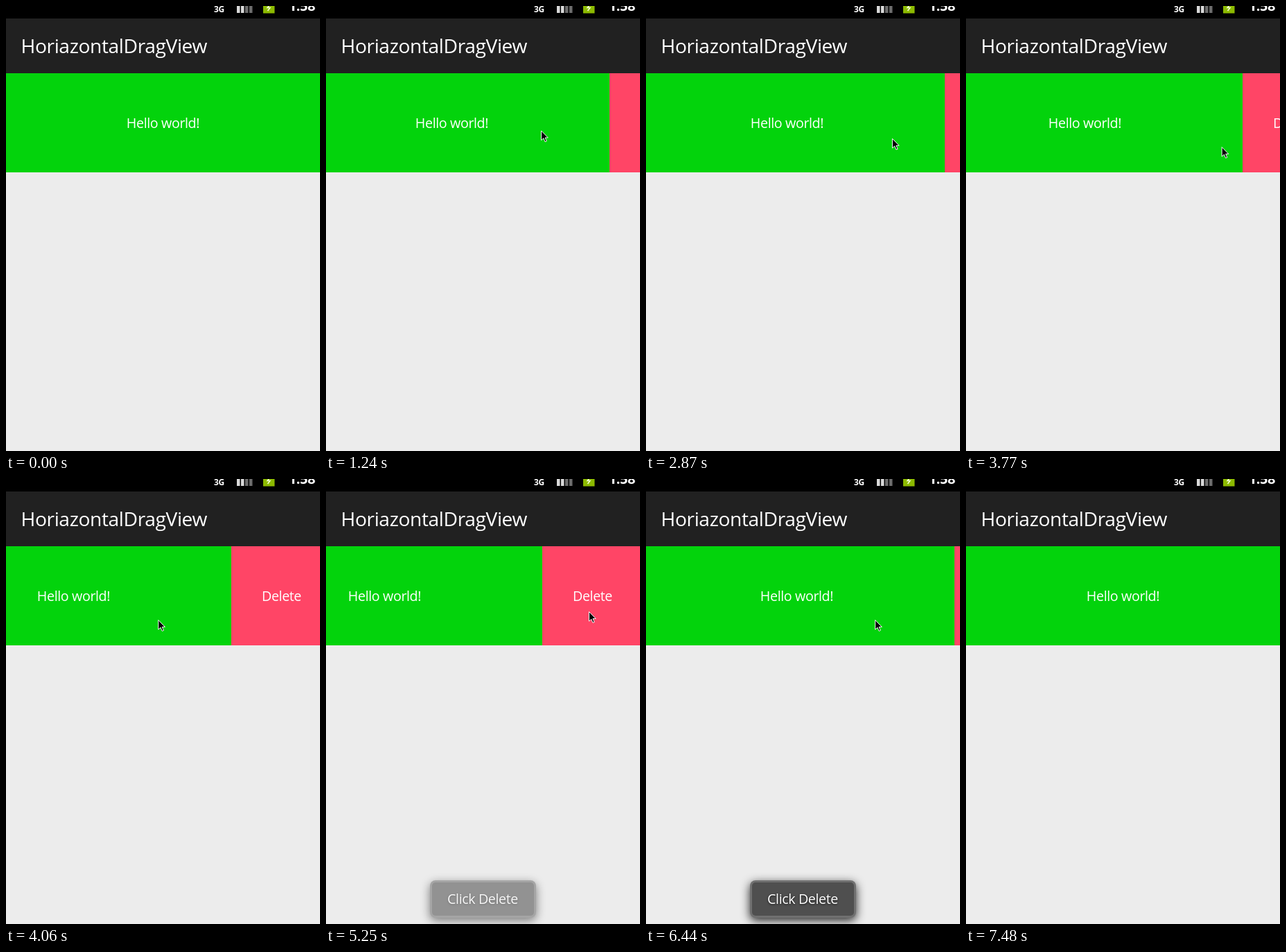
An HTML page with a canvas that plays this animation: 453 by 642 pixels, repeating every 7.66 s.

```html
<!DOCTYPE html>
<html lang="en">
<head>
<meta charset="utf-8">
<title>HoriazontalDragView</title>
<style>
  html, body { margin: 0; width: 100%; height: 100%; overflow: hidden; background: #ececec; }
  canvas { display: block; }
</style>
</head>
<body>
<canvas id="stage" width="453" height="642"></canvas>
<script>
const W = 453, H = 642, LOOP = 7660;
const START = 492, TICK = 148.5;   // the screen refreshes in coarse ticks
const PANEL = 142;                 // width of the delete button
const FONT = '"Open Sans", "Noto Sans", sans-serif';
const ctx = document.getElementById('stage').getContext('2d');

const clamp = v => Math.max(0, Math.min(1, v));

// Each move glides the cursor to x, y and the row to its open state
const away = { x: 480, y: 203, open: 0 };
const moves = [
  { at: 0, ticks: 1, x: 358, y: 167, open: 0 },
  { at: 1, ticks: 3, x: 348, y: 177, open: 0 },
  { at: 5, ticks: 5, x: 228, y: 185, open: 1, ease: 1.7 },
  { at: 14, ticks: 4, x: 380, y: 192, open: 0, ease: 1.3 },
  { at: 18, ticks: 1, ...away },
  { at: 22, ticks: 4, x: 192, y: 203, open: 1, ease: 1.7 },
  { at: 26, ticks: 3, x: 379, y: 191, open: 1 },
  { at: 34, ticks: 3, x: 198, y: 203, open: 1 },
  { at: 38, ticks: 4, x: 339, y: 203, open: 0, ease: 2 },
  { at: 42, ticks: 1, ...away }
];

function stateAt(k) {
  const state = { ...away };
  for (const { at, ticks, ease = 1, ...end } of moves) {
    const q = 1 - (1 - clamp((k - at + 1) / ticks)) ** ease;
    for (const key in end) state[key] += (end[key] - state[key]) * q;
  }
  return state;
}

const toastAlpha = k => Math.min(clamp((k - 31) * 0.57), clamp((47 - k) / 4));

function rect(color, x, y, w, h) {
  ctx.fillStyle = color;
  ctx.fillRect(x, y, w, h);
}

function text(c, str, x, y, size = 19.7, align = 'center', weight = 500) {
  c.font = `${weight} ${size}px ${FONT}`;
  c.letterSpacing = '-0.4px';
  c.textAlign = align;
  c.fillStyle = '#fff';
  c.fillText(str, x, y);
}

function rounded(c, color, x, y, w, h, r) {
  c.fillStyle = color;
  c.beginPath();
  c.roundRect(x, y, w, h, r);
  c.fill();
}

function shadow(c, color, blur, dy) {
  c.shadowColor = color;
  c.shadowBlur = blur;
  c.shadowOffsetY = dy;
}

function makeToast() {
  const layer = document.createElement('canvas');
  layer.width = W;
  layer.height = H;
  const c = layer.getContext('2d');
  shadow(c, 'rgba(0,0,0,0.85)', 14, 4);
  rounded(c, '#707070', 150, 579, 153, 54, 8);
  shadow(c, 'transparent', 0, 0);
  rounded(c, '#4f4f4f', 153, 582, 147, 48, 5);
  shadow(c, 'rgba(0,0,0,0.7)', 3, 1);
  text(c, 'Click Delete', 226, 612.5);
  return layer;
}

function drawStatusBar() {
  rect('#000', 0, 0, W, 18);
  text(ctx, '3G', 300, 9, 12, 'left', 700);
  for (let i = 0; i < 4; i++) rect(i < 2 ? '#dadada' : '#6c6c6c', 333 + i * 6, 0, 4.5, 10);
  rect('#8cba00', 371, 0, 16.5, 10.5);
  ctx.strokeStyle = '#f4ffd8';
  ctx.lineWidth = 1.5;
  ctx.stroke(new Path2D('M381 -2L377 2.5H381L377.5 7'));
  text(ctx, '1:58', 446, 7, 20, 'right', 700);
}

const arrow = new Path2D('M0 0V15.5L3.7 12.2L6.2 18L8.7 17L6.3 11.3H11Z');

function drawCursor(x, y) {
  ctx.save();
  ctx.translate(x + 0.5, y + 0.5);
  ctx.scale(0.88, 0.88);
  ctx.fillStyle = '#000';
  ctx.fill(arrow);
  ctx.strokeStyle = '#fff';
  ctx.lineWidth = 1.1;
  ctx.stroke(arrow);
  ctx.restore();
}

const toast = makeToast();

function draw(time) {
  const k = Math.floor((time - START) / TICK);
  const { x, y, open } = stateAt(k);
  const dx = Math.round(-PANEL * open);
  const edge = W + 1 + dx;

  rect('#ececec', 0, 0, W, H);
  drawStatusBar();
  rect('#212121', 0, 18, W, 79);
  text(ctx, 'HoriazontalDragView', 21.5, 68, 28.2, 'left', 400);

  rect('#ff4566', 0, 97, W, 143);
  rect('#03d30c', 0, 97, edge, 143);
  text(ctx, 'Hello world!', 226.5 + dx, 176);
  text(ctx, 'Delete', 526.5 + dx, 176);

  ctx.globalAlpha = toastAlpha(k);
  ctx.drawImage(toast, 0, 0);
  ctx.globalAlpha = 1;

  drawCursor(x, y);
}

let origin;
function loop(now) {
  if (origin === undefined) origin = now;
  draw((now - origin) % LOOP);
  requestAnimationFrame(loop);
}
draw(0);
requestAnimationFrame(loop);
</script>
</body>
</html>
```
